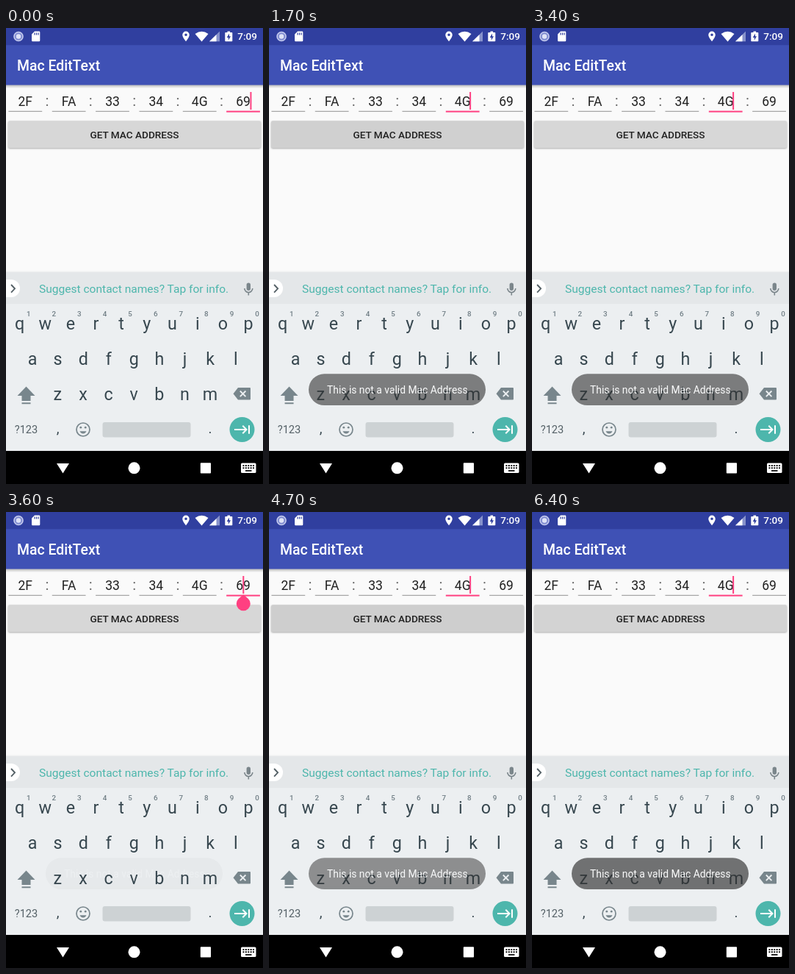
Animation of 350 by 620 pixels, one loop 6.5 s. Source, as an HTML page:

```html
<!DOCTYPE html>
<html lang="en">
<head>
<meta charset="utf-8">
<title>Mac EditText</title>
<style>
  html, body { margin: 0; width: 100%; height: 100%; overflow: hidden; background: #fafafa; }
  svg { display: block; width: 350px; height: 620px; font-family: Roboto, sans-serif; }
</style>
</head>
<body>
<svg id="stage" viewBox="0 0 350 620">
  <defs>
    <linearGradient id="shade" x2="0" y2="1">
      <stop offset="0" stop-color="#000" stop-opacity=".28"/>
      <stop offset="1" stop-color="#000" stop-opacity="0"/>
    </linearGradient>
  </defs>
  <rect width="350" height="620" fill="#fafafa"/>

  <!-- status bar and title -->
  <rect y="77" width="350" height="5" fill="url(#shade)"/>
  <rect width="350" height="77.5" fill="#3f51b5"/>
  <rect width="350" height="23.3" fill="#303f9f"/>
  <circle cx="17" cy="11.5" r="6" fill="#7f8bd0" stroke="#c5cbee" stroke-width="1.6"/>
  <circle cx="17" cy="11.5" r="3.2" fill="#dfe3f7"/>
  <path d="M39 4.5H45a1.3 1.3 0 0 1 1.3 1.3V17a1.3 1.3 0 0 1-1.3 1.3H36.300a1.3 1.3 0 0 1-1.300-1.300V8.500Z" fill="#fff"/>
  <path d="M39 6.500v3M41.500 6.500v3M44 6.500v3" stroke="#303f9f" stroke-width="1.200"/>
  <path d="M245 4.500a4.700 4.700 0 0 1 4.700 4.700c0 3.500-4.700 9-4.700 9s-4.700-5.500-4.700-9A4.700 4.700 0 0 1 245 4.500Z" fill="#fff"/>
  <circle cx="245" cy="9.200" r="1.700" fill="#303f9f"/>
  <path d="M257.500 8Q266.500 1.500 275.500 8L266.500 18.500Z" fill="#fff"/>
  <path d="M277 18.300L291 4.500V18.300Z" fill="#8792cb"/>
  <path d="M277 18.300L286.500 9V18.300Z" fill="#fff"/>
  <path d="M301.500 4.500h3.600v1.500h2.400a.8.8 0 0 1 .8.8V17.500a.8.8 0 0 1-.8.8h-8.400a.8.8 0 0 1-.8-.8V6.800a.8.8 0 0 1 .8-.8h2.400Z" fill="#fff"/>
  <path d="M304 7.500L300.700 13h2.100v3.800L306 11.300h-2Z" fill="#303f9f"/>

  <!-- form -->
  <g id="fields"></g>
  <rect id="button" x="3" y="126.300" width="344" height="36.700" rx="2"/>
  <g id="cursor" fill="#ff4081">
    <path id="handle" d="M0 112.300L6.700 118A9.500 9.500 0 1 1-6.700 118Z"/>
    <rect id="caret" x="-1" y="87" width="2" height="24"/>
  </g>

  <!-- keyboard -->
  <rect y="330.500" width="350" height="2" fill="#f0f1f2"/>
  <rect y="332" width="350" height="243" fill="#eceff1"/>
  <rect y="332" width="350" height="43" fill="#e4e7e9"/>
  <path d="M0 342H7a12 12 0 0 1 0 24H0Z" fill="#fff"/>
  <path d="M7 349l5 5.300-5 5.300" fill="none" stroke="#546066" stroke-width="1.900"/>
  <rect x="327.600" y="346.500" width="5.400" height="10.500" rx="2.700" fill="#7b868b"/>
  <path d="M324.800 354a5.500 5.500 0 0 0 11 0M330.300 359.500v4" fill="none" stroke="#7b868b" stroke-width="1.600"/>
  <path d="M27.500 487.500L39.500 500H33.500V507H21.500V500H15.500ZM21.500 509.300h12v1.900h-12Z" fill="#78868c"/>
  <path d="M316 489h16a1 1 0 0 1 1 1v14.500a1 1 0 0 1-1 1H316L309.500 497.300Z" fill="#78868c"/>
  <path d="M318.800 493.500l7.600 7.600m0-7.600l-7.600 7.600" stroke="#eceff1" stroke-width="1.900"/>
  <g fill="none" stroke="#78868c" stroke-width="1.700">
    <circle cx="105" cy="546" r="9"/>
    <path d="M100.500 548.300a4.800 4.800 0 0 0 9 0Z" fill="#78868c" stroke="none"/>
  </g>
  <circle cx="101.800" cy="543.200" r="1.400" fill="#78868c"/>
  <circle cx="108.200" cy="543.200" r="1.400" fill="#78868c"/>
  <rect x="131.500" y="536" width="120" height="20.500" rx="3" fill="#cdd2d4"/>
  <circle cx="321.500" cy="546" r="17" fill="#4db6ac"/>
  <path d="M311 546h16M322.300 540.800l5.200 5.200-5.200 5.200M331 540.200v11.600" fill="none" stroke="#fff" stroke-width="2"/>
  <g id="labels"></g>

  <!-- navigation bar -->
  <rect y="575" width="350" height="45" fill="#000"/>
  <g fill="#fff">
    <path d="M69 592H86L77.500 605.500Z"/>
    <circle cx="174.500" cy="598.300" r="8"/>
    <rect x="264.800" y="591.300" width="14.200" height="14.200" rx=".8"/>
    <rect x="320" y="591.500" width="20.500" height="13.500" rx="1.500"/>
  </g>
  <path d="M322.500 595h16M322.500 598.300h16" stroke="#000" stroke-width="1.900" stroke-dasharray="1.900 1.500"/>
  <path d="M326 602h8.500" stroke="#000" stroke-width="1.700"/>

  <g id="toast">
    <rect x="54" y="470.300" width="241" height="42.700" rx="21.300" fill="#323232" fill-opacity=".79"/>
  </g>
</svg>
<script>
const LOOP = 6500, STEP = 100;
const NS = 'http://www.w3.org/2000/svg';
const $ = id => document.getElementById(id);

function add(parent, tag, attrs, text) {
  const el = document.createElementNS(NS, tag);
  for (const k in attrs) el.setAttribute(k, attrs[k]);
  if (text) el.textContent = text;
  return parent.appendChild(el);
}

function label(parent, text, x, y, size, fill, anchor = 'middle', weight = 400) {
  return add(parent, 'text',
    { x, y, fill, 'font-size': size, 'text-anchor': anchor, 'font-weight': weight }, text);
}

// Address fields
const fieldX = i => 26.3 + 59.35 * i;
const fields = ['2F', 'FA', '33', '34', '4G', '69'].map((value, i) => {
  const g = add($('fields'), 'g', {});
  label(g, value, fieldX(i), 106, 17.5, '#212121');
  const line = add(g, 'rect', { x: fieldX(i) - 22.9, width: 45.8 });
  if (i < 5) label($('fields'), ':', fieldX(i) + 29.7, 106, 20.5, '#6b6b6b');
  return { g, line };
});

// Captions and keys
const stage = $('stage'), keys = $('labels');
label(stage, 'Mac EditText', 15, 58, 19.4, '#fff', 'start', 500);
label(stage, '7:09', 342, 16.3, 13.6, '#fff', 'end', 500);
label(stage, 'GET MAC ADDRESS', 175, 150, 13.6, '#212121', 'middle', 500);
label(keys, 'Suggest contact names? Tap for info.', 45, 360, 15.55, '#4db6ac', 'start');
const PITCH = 34.6;
[['qwertyuiop', 18.7, 410], ['asdfghjkl', 36, 458], ['zxcvbnm', 70.4, 506]]
  .forEach(([row, x, y]) => [...row].forEach((ch, i) =>
    label(keys, ch, x + PITCH * i, y, 23.3, '#37474f')));
[...'1234567890'].forEach((d, i) =>
  label(keys, d, 30.7 + PITCH * i, 391.5, 9.8, '#6f7d84', 'middle', 500));
label(keys, '?123', 27.5, 551, 14.6, '#546066');
label(keys, ',', 70.5, 551, 19, '#37474f');
label(keys, '.', 278, 551, 19, '#37474f');
label($('toast'), 'This is not a valid Mac Address', 174.8, 497, 13.85, '#fff');

// Timeline
const PRESSES = [{ down: 1300, fail: 1300 }, { down: 4300, fail: 4400 }];
const TOASTS = [[1495, 3208], [4537, 6240]];
const FADE = 400;
const CARET_ON = [[0, 100], [500, 1000], [1300, 1800], [2200, 2700], [3100, 4100], [4400, 4900],
  [5400, 5800], [6300, 6500]];

const clamp = v => Math.min(1, Math.max(0, v));
const within = (t, [a, b]) => t >= a && t < b;

function shakeAt(t) {
  return PRESSES.reduce((sum, { fail }) => {
    const k = (t - fail) / 100;
    return k < 0 || k > 3 ? sum : sum + 10 * (1 - k / 3) * Math.cos(Math.PI * k);
  }, 0);
}

function toastAt(t) {
  return Math.max(...TOASTS.map(([show, hide]) => {
    const fadeIn = 1 - (1 - clamp((t - show) / FADE)) ** 2;
    return fadeIn * (1 - clamp((t - hide) / FADE) ** 2);
  }));
}

function drawButton(t) {
  const second = t >= 4300;
  const press = PRESSES[+second];
  const held = t < press.down ? 0 : 1 - clamp((t - press.down - 400) / 200);
  const rest = second ? 211 : 215, dark = second ? 206 : 208;
  const c = Math.round(rest + (dark - rest) * held);
  const lift = t >= 1300 ? 1 - clamp((t - 1300) / 300) : 0;
  $('button').setAttribute('fill', `rgb(${c},${c},${c})`);
  $('button').style.filter =
    `drop-shadow(0 ${1 + lift * 1.5}px ${0.9 + lift * 1.3}px rgba(0,0,0,${0.32 + lift * 0.08}))`;
}

function draw(t) {
  const tapped = within(t, [3600, 4400]);
  const active = tapped || t < 1300 ? 5 : 4;
  const shake = shakeAt(t);
  fields.forEach(({ g, line }, i) => {
    const on = i === active;
    line.setAttribute('y', on ? 112.6 : 112.8);
    line.setAttribute('height', on ? 2 : 1);
    line.setAttribute('fill', on ? '#ff4081' : '#929292');
    g.setAttribute('transform', `translate(${i === 4 ? shake : 0})`);
  });
  const x = tapped ? 323.3 : fieldX(active) + 10.4 + (active === 4 ? shake : 0);
  $('cursor').setAttribute('transform', `translate(${x})`);
  $('caret').setAttribute('opacity', +CARET_ON.some(span => within(t, span)));
  $('handle').setAttribute('opacity', +tapped);
  drawButton(t);
  $('toast').setAttribute('opacity', toastAt(t));
}

const start = performance.now();
function tick() {
  const t = (performance.now() - start) % LOOP;
  draw(Math.floor(t / STEP) * STEP);
  requestAnimationFrame(tick);
}
tick();
</script>
</body>
</html>
```
